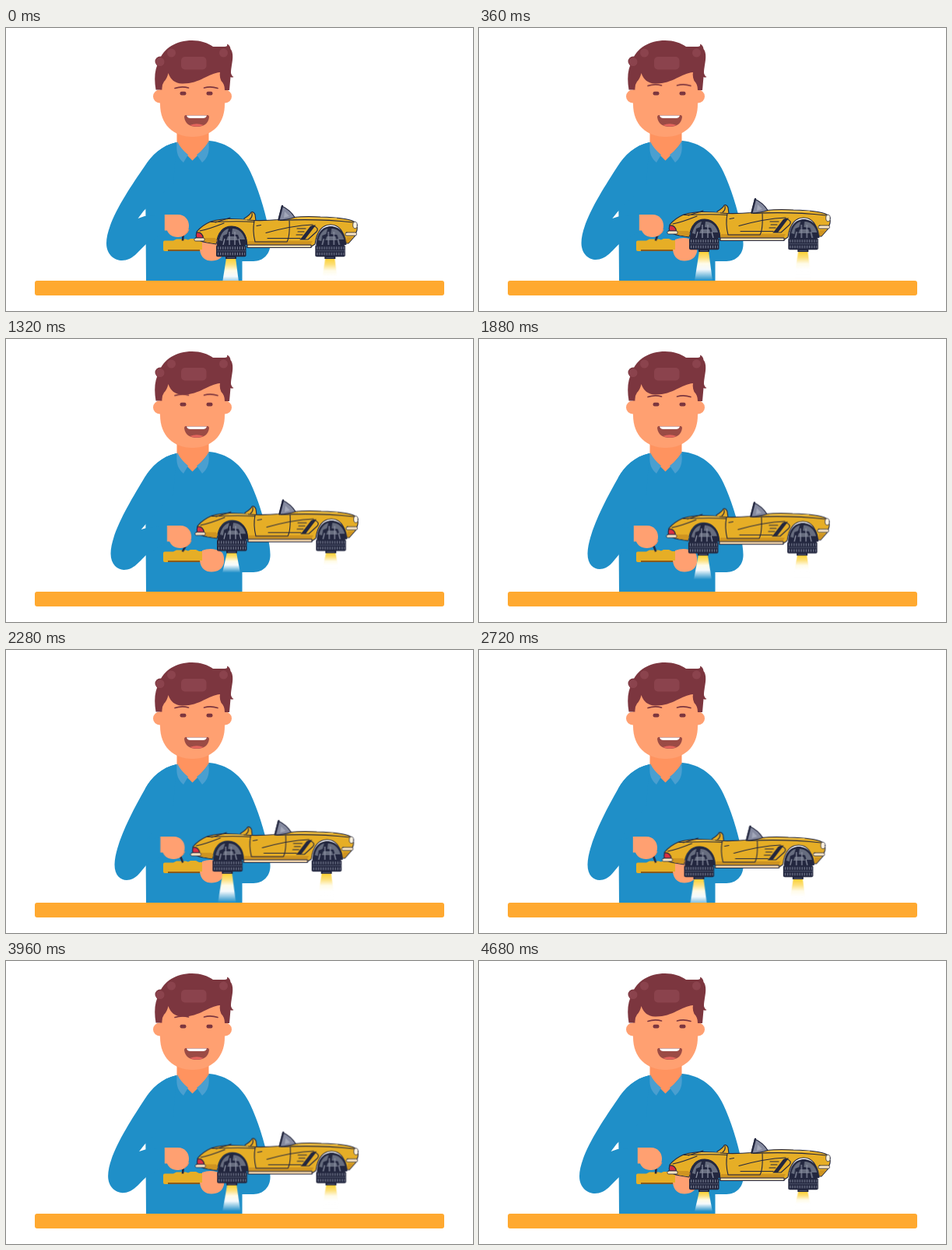
An HTML page for the animation above (4720 ms loop, 600 by 364 pixels).

```html
<!DOCTYPE html>
<html lang="en">
<head>
<meta charset="utf-8">
<title>Hover car</title>
<style>
html, body { margin: 0; width: 100%; height: 100%; overflow: hidden; background: #fff; }
svg { display: block; width: 100%; height: 100%; }

.skin { fill: #ffa071; }
.shirt { fill: #1f8fc8; }
.collar { fill: #4a9fd0; }
.hair { fill: #7c363f; }
.curl { fill: #8b434d; }
.brow { fill: none; stroke: #7c363f; stroke-width: 1.7; stroke-linecap: round; }
.ink { fill: none; stroke: #23273f; stroke-width: 1.1; stroke-linecap: round; stroke-linejoin: round; }
.paint { fill: #e6ae26; }
.dark { fill: #23273f; }
.steel { fill: #676d7f; }
.chrome { fill: #fbe6c3; }

.move { animation: 4720ms cubic-bezier(.37, 0, .63, 1) infinite; }
#drift { animation-name: drift; }
#hover { animation-name: hover; }
#arm { animation-name: arm; }
#hand { animation-name: hand; }
#stick { animation-name: stick; transform-origin: 227px 273px; }
#brows { animation-name: brows; }
#eyes { animation-name: blink; transform-origin: 245px 84px; }
.jet { transform-origin: 289px 297px; animation: jet 472ms linear infinite; }

@keyframes drift {
  0%, 15.25%, 99.2%, 100% { transform: translateX(0); }
  29.7% { transform: translateX(1px); }
  57.6% { transform: translateX(-6.5px); }
  71.2% { transform: translateX(-6px); }
  81.4%, 85% { transform: translateX(1.2px); }
}
@keyframes hover {
  0%, 93.2%, 100% { transform: translateY(0); }
  17%, 33% { transform: translateY(-21.5px); }
  59.3% { transform: translateY(-2px); }
  74.6% { transform: translateY(-17px); }
}
@keyframes hand {
  0%, 71.2%, 100% { transform: translateX(0); }
  15.25%, 25% { transform: translateX(4px); }
  39.8% { transform: translateX(-5px); }
  57.6% { transform: translateX(-6px); }
}
@keyframes stick {
  0%, 71.2%, 100% { transform: rotate(0); }
  15.25%, 25% { transform: rotate(28deg); }
  39.8%, 57.6% { transform: rotate(-26deg); }
}
@keyframes brows {
  0%, 99%, 100% { transform: translateY(0); }
  13%, 25%, 70%, 85% { transform: translateY(-5px); }
  38%, 60% { transform: translateY(-3px); }
}
@keyframes blink {
  0%, 75.5%, 79.5%, 100% { transform: scaleY(1); }
  77%, 78% { transform: scaleY(.15); }
}
@keyframes jet {
  0%, 40%, 90%, 100% { transform: scaleY(1); }
  55%, 73% { transform: scaleY(.68); }
}
@keyframes arm {
  0%, 94.5%, 100% { d: path("M219 147C200 151 187 164 178 178C158 207 129 250 129 277C129 292 140 299 149 299C163 299 170 287 180 278L206 262L206 240L178 242L169.500 245L177 235L215 200Z"); }
  15.25%, 25%, 71.2% { d: path("M219 147C200 151 187 164 178 178C160 208 134 250 134 276C134 290 143 297 151 297C164 297 171 286 180 278L206 262L206 240L180 243L173 245L179 238L215 200Z"); }
  39.8%, 57.6% { d: path("M219 147C200 151 187 164 179 178C162 208 140 250 139.500 276C139.500 290 147 296 155 296C167 296 172 286 180 277L206 262L206 240L184 243L180 244L184 240L215 200Z"); }
}
</style>
</head>
<body>
<svg viewBox="0 0 600 364">
  <defs>
    <linearGradient id="glow" x1="0" y1="0" x2="0" y2="1">
      <stop offset="0" stop-color="#fbd02c"/>
      <stop offset=".22" stop-color="#fde07a"/>
      <stop offset=".42" stop-color="#fffbe8"/>
      <stop offset=".62" stop-color="#fff" stop-opacity=".95"/>
      <stop offset="1" stop-color="#fff" stop-opacity="0"/>
    </linearGradient>

    <g id="wheel">
      <path class="jet" fill="url(#glow)" d="M283 296H295L300 334H277Z"/>
      <path class="dark" d="M271 279C271 264 279 255 290 255S310 264 310 279Z"/>
      <path class="steel" d="M274 273C276 264 281 259 286 258L284 265L279 267L278 274ZM291 258C299 258 305 264 307 272L300 272L298 266L290 265ZM285 268H296L298 273H283Z"/>
      <path d="M279 279L281 271M287 279V262M294 279V262M301 279L299 271" fill="none" stroke="#8b90a2" stroke-width="1.300"/>
      <path class="dark" d="M282 293H296V297H282Z"/>
      <rect class="dark" x="270" y="279" width="38.500" height="15.200" rx="2"/>
      <path d="M272 283H307M272 290.500H307" stroke="#757b8f" stroke-width="3.600" stroke-dasharray="1.200 1.900"/>
      <path d="M271 286.700H308M284 295.500H294" stroke="#555b72" stroke-width=".9"/>
    </g>
  </defs>

  <!-- body -->
  <path class="shirt" d="M219 147C200 151 187 164 179 178L180 325H303.500V300H318C331 300 340 290 339.500 277C339 255 326 210 314 185C303 161 284 147 261 145Z"/>
  <path id="arm" class="shirt move" d="M219 147C200 151 187 164 178 178C158 207 129 250 129 277C129 292 140 299 149 299C163 299 170 287 180 278L206 262L206 240L178 242L169.500 245L177 235L215 200Z"/>
  <path fill="#ff935f" d="M219.500 125H260.500V147L247 163L239.500 170.500L232 163L219.500 149Z"/>
  <path class="collar" d="M220 146C218 157 220 167 228 173L234 163Q225 156 220 146ZM260 146C262 157 260 167 252 173L245 163Q255 156 260 146Z"/>

  <!-- head -->
  <circle class="skin" cx="197.500" cy="88" r="8.500"/>
  <circle class="skin" cx="281.500" cy="88" r="8.500"/>
  <path class="skin" d="M198 55H281V98C281 124 264 140 239.500 140S198 124 198 98Z"/>
  <g id="brows" class="brow move">
    <path d="M217 77.500Q226 74.500 234.500 77"/>
    <path d="M254.500 77Q263 74.500 272 77.500"/>
  </g>
  <g id="eyes" class="hair move">
    <rect x="223.500" y="81.800" width="8" height="4.600" rx="2.200"/>
    <rect x="257.500" y="81.800" width="8" height="4.600" rx="2.200"/>
  </g>
  <path fill="#9b4b45" d="M231 112H259Q261 112 261 114.500C260 123 254 127 245 127S230 123 229 114.500Q229 112 231 112Z"/>
  <path fill="#fff" d="M232 112.500H258Q257 116 253 116H237Q233 116 232 112.500Z"/>
  <path fill="#e5655d" d="M236 125Q245 121.500 254 125Q245 128.500 236 125Z"/>
  <path class="hair" d="M192.500 79.500C190 65 191 52 197 42C202 26 219 16 239 16C250 16 259 19 266 24H281Q285 24 284 20.500Q288 22 288.500 27Q292 31 291 41C290 49 289 53 289 58Q290 62 292.500 63Q290 64 288.500 63L287 80H281Q281 72 276.500 68Q274 63 275 57C260 58 249 72 226 71.500Q213 71 208.500 58Q207 65 203 69Q200 73 200.500 79.500Z"/>
  <rect class="curl" x="225" y="37" width="32.500" height="16.500" rx="5"/>
  <circle class="hair" cx="198" cy="43" r="6.500"/>
  <circle class="curl" cx="198" cy="43.500" r="5.500"/>
  <circle class="curl" cx="212.500" cy="32" r="5.500"/>
  <circle class="curl" cx="279.500" cy="32" r="5.500"/>

  <!-- controller and hands -->
  <path class="paint" d="M202 275.500Q202 273.500 204 273.500H215L219 271.500H231L234 272.500L237 271H244L248 273H254V287H204Q202 287 202 285Z"/>
  <path d="M208 286H252" stroke="#8a5b1c" stroke-width="1.800"/>
  <path id="stick" class="move" d="M227 273.500L228 262" stroke="#23273f" stroke-width="2.600"/>
  <path class="skin" d="M252 272Q265 267 277 274Q281 278 280 288C278 296 272 299.500 264 299.500S250 295 249 285H252Z"/>
  <g id="hand" class="move">
    <path class="skin" d="M203.800 240H221C230 240 235 247 235 254Q235 260 232 264Q229 268.500 221 269C213 269 209 265 207 260.500H203.800Z"/>
    <path d="M229 266Q234 264 235 259" fill="none" stroke="#f58d5c" stroke-width="1"/>
  </g>

  <!-- car -->
  <g id="drift" class="move"><g id="hover" class="move">
    <path class="paint ink" style="fill:#e6ae26" d="M306 245Q313 241 315 237Q318 235.500 320 240L321 248H306Z"/>
    <path class="ink" d="M313 246Q317 243 316 238"/>
    <path class="ink" style="fill:#e6ae26" d="M245 262C250 256 256 252 263 249C278 244 296 245 318 247.500Q334 248 350 246.500C368 242.500 388 242 404 243C422 243.500 440 245 447 249Q452 253 451 260L448 268L440 277H436C434 260 427 253 417 253S399 261 397 278L391 282H310C310 264 301 255 290 255S272 263 270 278L258 276Q247 274 245 270Z"/>
    <path fill="#cf9420" d="M247 270H269L271 274L269 277L258 275.500ZM311 274H394L391 279H311ZM438 269H446L440 276H437Z"/>
    <path class="ink" style="fill:#fbdcae" d="M310 279H392V282.500H310Z"/>
    <path class="ink" d="M263 249.500C280 249 300 248 319 249.500M249 261C260 259 270 255 280 251M319 248C317 258 318 267 320 275H361Q365 268 364 247M352 247.500Q400 245 446 250M269 250L288 244M322 254.500L327.500 253.500"/>
    <path class="ink" d="M334 263.500C350 259 370 254 394 253M336 270.500H378M374 258H385M375 262H383M373 266H381"/>
    <path class="dark" d="M378 272L391 255Q394 253 398 253.500L384 272Z"/>
    <path class="ink" d="M394 254Q403 257 399 262L388 272H378"/>
    <path d="M285 247H310M374 244.800H425" stroke="#f4cc5c" stroke-width="1"/>
    <path class="ink" style="fill:#858aa0" d="M350 247L354.500 229Q365 234 371 243.500Q361 247 350 247Z"/>
    <path d="M350.500 246.500L355 229" stroke="#23273f" stroke-width="2.400" stroke-linecap="round"/>
    <path d="M357 244L358 236L364 242Z" fill="#a3a8ba"/>
    <path class="ink" style="fill:#da3042" d="M245 263Q252 262 253.500 270H245Q243.500 267 245 263Z"/>
    <rect class="ink" style="fill:#fbe6c3;stroke-width:.8" x="242" y="270" width="13" height="4" rx="1.600"/>
    <rect class="ink" style="fill:#fbe6c3;stroke-width:.8" x="436" y="263" width="14.500" height="4" rx="1.800"/>
    <ellipse class="ink" style="fill:#fff3df;stroke-width:.8" cx="448.500" cy="253.500" rx="2.800" ry="4.200"/>
    <use href="#wheel"/>
    <use href="#wheel" x="127.300"/>
  </g></g>

  <rect x="37" y="325" width="526" height="19" rx="3" fill="#ffa930"/>
</svg>
</body>
</html>
```
